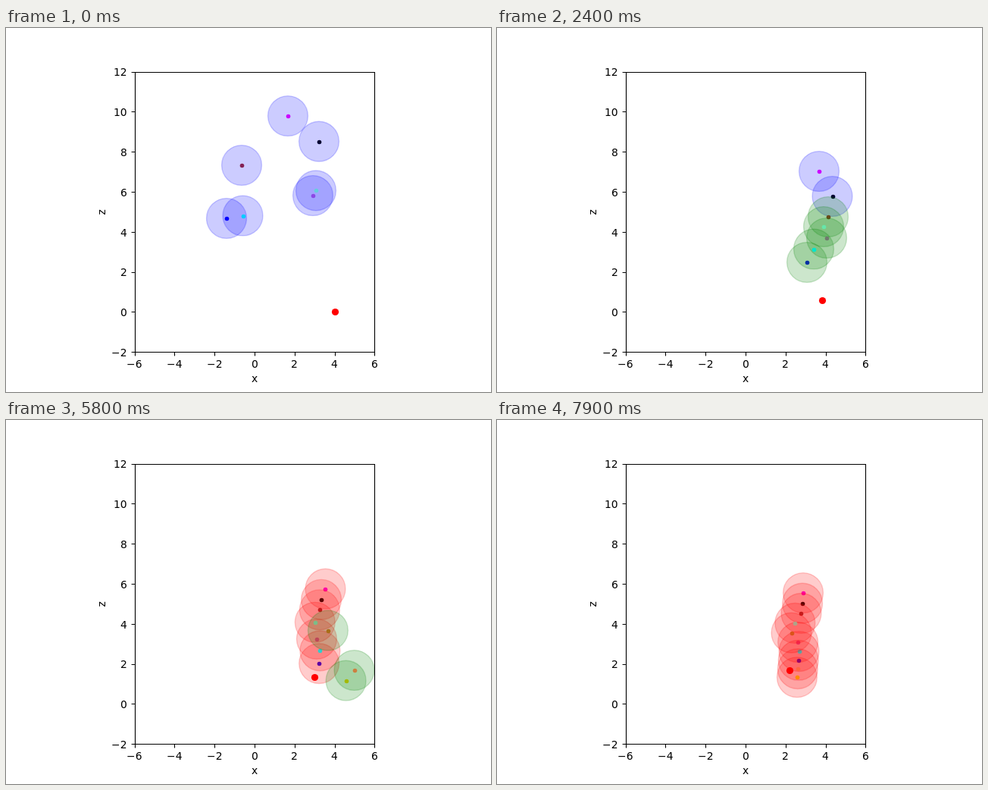
Animation of 640x480 px, one loop 8 s. Source, as an HTML page:

```html
<!DOCTYPE html>
<html lang="en">
<head>
<meta charset="utf-8">
<title>Agents following a leader</title>
<style>
  html, body { margin: 0; width: 100%; height: 100%; overflow: hidden; background: #fff; }
  svg { display: block; width: 640px; height: 480px; }
  text { font: 13.89px "DejaVu Sans", sans-serif; }
  .axis { fill: none; stroke: #000; stroke-width: 1.11; }
  .zone { fill-opacity: .2; stroke-opacity: .2; stroke-width: 1.39; }
</style>
</head>
<body>
<svg id="stage" viewBox="0 0 640 480">
  <clipPath id="plot"><rect x="169.6" y="57.6" width="316.8" height="369.6"/></clipPath>
  <g id="agents" clip-path="url(#plot)"></g>
  <g id="axes"></g>
</svg>
<script>
const LOOP = 8000, STEP = 100, UNIT = 26.4;
const px = x => 328 + UNIT * x;
const py = z => 374.4 - UNIT * z;
const snap = v => Math.round(v) + .5;

function add(parent, tag, attrs) {
  const el = document.createElementNS('http://www.w3.org/2000/svg', tag);
  for (const k in attrs) el.setAttribute(k, attrs[k]);
  document.getElementById(parent).append(el);
  return el;
}

// Text on whole pixels; align 0 = left, .5 = centre, 1 = right
function label(text, x, y, align) {
  const el = add('axes', 'text', { y: Math.round(y) });
  el.textContent = String(text).replace('-', '\u2212');
  el.setAttribute('x', Math.round(x - align * el.getComputedTextLength()));
  return el;
}

// Axes
let ticks = 'M170.5 58.5H486.5V427.5H170.5Z';
for (let n = -6; n <= 6; n += 2) {
  ticks += `M${snap(px(n))} 427.5v4.9`;
  label(n, px(n), 448, .5);
}
for (let n = -2; n <= 12; n += 2) {
  ticks += `M170.5 ${snap(py(n))}h-4.9`;
  label(n, 159.9, py(n) + 5.85, 1);
}
add('axes', 'path', { class: 'axis', d: ticks });
label('x', 328, 467, .5);
label('z', 0, 0, .5).setAttribute('transform', 'translate(131 242.4) rotate(-90)');

// The agents line up in a column behind the leader, which later closes up
// and drifts left; both columns dent to the left near the middle.
const dent = (k, centre, depth) => depth * Math.exp(-((k - centre) ** 2));
const firstSlot = k => [432 - 1.6 * k - dent(k, 3, 5), 215 + 15.3 * k + .47 * k * k];
const lastSlot = k => [404 - .9 * k - dent(k, 3.7, 13), 228 + 13.8 * k - .16 * k * k];

// Monotone cubic through the points (ts[i], vs[i])
function curve(ts, vs) {
  const last = ts.length - 1;
  const secant = i => (vs[i + 1] - vs[i]) / (ts[i + 1] - ts[i]);
  const slope = i => {
    if (i === 0) return secant(0);
    if (i === last) return secant(last - 1);
    const a = secant(i - 1), b = secant(i);
    return a * b > 0 ? 2 * a * b / (a + b) : 0;
  };
  return t => {
    if (t <= ts[0]) return vs[0];
    let i = 0;
    while (i < last - 1 && t > ts[i + 1]) i++;
    const h = ts[i + 1] - ts[i], u = (t - ts[i]) / h, w = 1 - u;
    return w * w * (1 + 2 * u) * vs[i] + u * u * (3 - 2 * u) * vs[i + 1]
      + h * u * w * (w * slope(i) - u * slope(i + 1));
  };
}

function agent(colour, green, red, times, points) {
  return {
    green, red,
    x: curve(times, points.map(p => p[0])),
    y: curve(times, points.map(p => p[1])),
    dot: add('agents', 'circle', { r: 2.8, fill: colour }),
    zone: add('agents', 'circle', { r: UNIT, class: 'zone' })
  };
}

// Rank is the place in the closed column; newcomers push in at rank 4 and at the end
const early = (colour, rank, green, ...way) =>
  agent(colour, green, 4.7, [0, .9, 2.4, 3.7, 7.9],
    [...way, firstSlot(rank > 4 ? rank - 1 : rank), lastSlot(rank)]);
const newcomer = (colour, rank, green, red, ...way) =>
  agent(colour, green, red, [3.7, 5.1, 6.5, 7.9], [...way, lastSlot(rank)]);

const leader = add('agents', 'circle', { r: 4.6, fill: 'red' });
const agents = [
  early('magenta', 0, 3.1, [372, 116], [429, 142], [425, 189]),
  early('black', 1, 2.8, [413, 149.6], [448.5, 176], [442.5, 222]),
  early('brown', 2, 2.1, [311, 181], [369, 207], [437, 249]),
  early('orchid', 5, 1.5, [405, 221], [448.5, 247], [435, 277]),
  early('aquamarine', 3, 1.7, [409, 214.4], [449, 240.5], [431, 262]),
  early('blue', 7, .6, [291, 251], [346, 280], [409, 309]),
  early('cyan', 6, .6, [312.5, 247.5], [364, 268], [418, 291.5]),
  newcomer('chocolate', 4, 5.5, 6.1, [524, 240], [459, 267], [401, 283]),
  newcomer('gold', 9, 4.5, 6.9, [543, 341], [480, 344], [423, 343]),
  newcomer('coral', 8, 4.5, 6.9, [553, 330], [490, 330], [433, 330])
];

function place(el, x, y) {
  el.setAttribute('cx', x);
  el.setAttribute('cy', y);
}

function draw(t) {
  place(leader, snap(px(4 * Math.cos(t / 8))), snap(py(2 * Math.sin(t / 8))));
  for (const a of agents) {
    const x = a.x(t), y = a.y(t);
    const state = t >= a.red ? 'red' : t >= a.green ? 'green' : 'blue';
    place(a.dot, snap(x), snap(y));
    place(a.zone, x, y);
    a.zone.setAttribute('fill', state);
    a.zone.setAttribute('stroke', state);
  }
}

const start = performance.now();
function tick() {
  const ms = (performance.now() - start) % LOOP;
  draw(Math.floor(ms / STEP) * STEP / 1000);
  requestAnimationFrame(tick);
}
tick();
</script>
</body>
</html>
```
